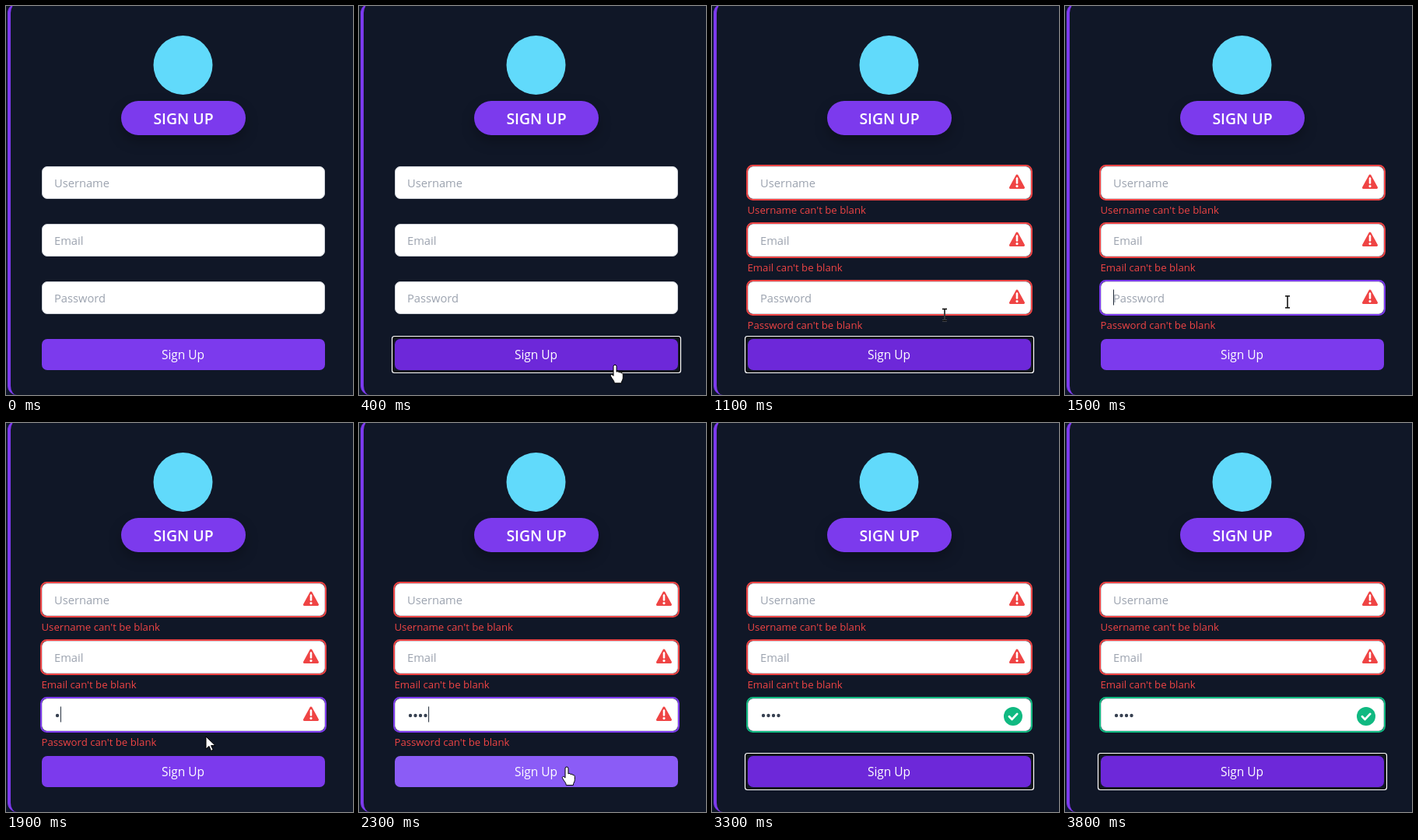
These frames come from a looping animation (446x500 px, 3.9 s). An HTML page:

```html
<!DOCTYPE html>
<html lang="en">
<head>
<meta charset="utf-8">
<title>Sign up form</title>
<style>
  html, body { margin: 0; width: 100%; height: 100%; overflow: hidden; background: #0f172a; }
  svg { display: block; width: 446px; height: 500px; font-family: "Open Sans", "Noto Sans", sans-serif; }
  .pill { fill: #7c3aed; filter: drop-shadow(0 8px 8px rgba(0, 0, 0, .25)); }
  .title { font-size: 19.4px; font-weight: 600; fill: #fff; text-anchor: middle; }
  .label { font-size: 15.5px; fill: #fff; text-anchor: middle; }
  .box { fill: #fff; stroke: #d1d5db; }
  .hint { font-size: 14.7px; fill: #9ca3af; }
  .error { font-size: 13.2px; fill: #ef4444; }
</style>
</head>
<body>
<svg viewBox="0 0 446 500">
  <defs>
    <g id="alert">
      <path d="M392 218 400.5 233.5H383.5Z" fill="#ef4444" stroke="#ef4444" stroke-width="3" stroke-linejoin="round"/>
      <path d="M392 221.5v6" stroke="#fff" stroke-width="2.6" stroke-linecap="round"/>
      <circle cx="392" cy="231.6" r="1.6" fill="#fff"/>
    </g>
  </defs>

  <rect x="2" y="-3" width="500" height="503" rx="12" fill="#7c3aed"/>
  <rect x="6" y="-3" width="496" height="503" rx="8" ry="12" fill="#101727"/>

  <circle cx="227.5" cy="76" r="38" fill="#61dafb"/>
  <rect class="pill" x="148" y="122" width="160" height="44" rx="22"/>
  <text class="title" x="228" y="152">SIGN UP</text>

  <g id="fields"></g>

  <g id="typed" fill="#374151"></g>
  <path id="caret" stroke="#1f2937"/>
  <g id="check">
    <circle cx="387" cy="377" r="12" fill="#10b981"/>
    <path d="M382 377.3l3.6 3.6 6.6-7" fill="none" stroke="#fff" stroke-width="2.8" stroke-linecap="round" stroke-linejoin="round"/>
  </g>

  <g id="focus" fill="none">
    <rect x="44" y="426" width="368" height="44" rx="3" stroke="#101010" stroke-width="2"/>
    <rect x="42.5" y="424.5" width="371" height="47" rx="3" stroke="#fff" stroke-width="1.2"/>
  </g>
  <rect id="button" x="46" y="428" width="364" height="40" rx="7"/>
  <text class="label" x="227.5" y="454">Sign Up</text>

  <g id="pointer" stroke-linejoin="round">
    <path id="arrow" d="M0 0v16l4-3.6 2.6 6 2.6-1.2-2.6-5.6h5.4z" fill="#fff" stroke="#000"/>
    <path id="hand" d="M-2 2a2 2 0 0 1 4 0v7c1-1 3-.6 3.2.8 1-1 2.7-.5 2.8 1 1-.8 2.3 0 2.3 1.8v4c0 3-2 4-2 7h-9c0-3-2.6-5-4.8-9-.8-1.8 1.2-3 2.6-1.4l.9.9z" fill="#fff" stroke="#000"/>
    <g id="beam" fill="none">
      <path d="M-3-7.5h6M0-7.5v15M-3 7.5h6" stroke="#777" stroke-width="1.8"/>
      <path d="M-3-7.5h6M0-7.5v15M-3 7.5h6" stroke="#000"/>
    </g>
  </g>
</svg>
<script>
  const LOOP = 3900, STEP = 100;
  const RED = [239, 68, 68], VIOLET = [124, 58, 237], GREEN = [16, 185, 129], WHITE = [255, 255, 255];
  const $ = id => document.getElementById(id);
  const show = (el, on) => { el.style.display = on ? "" : "none"; };
  const within = (t, a, b) => t >= a && t < b;

  const fields = ["Username", "Email", "Password"].map((name, i) => {
    const g = document.createElementNS("http://www.w3.org/2000/svg", "g");
    g.setAttribute("transform", `translate(0 ${74 * i})`);
    g.innerHTML = `
      <rect class="box" x="46.5" y="206.5" width="363" height="41" rx="6.5"/>
      <rect class="ring" x="45" y="205" width="366" height="44" rx="7.5" fill="none" stroke-width="2"/>
      <text class="hint" x="62" y="233">${name}</text>
      <g class="bad"><use href="#alert"/><text class="error" x="45.5" y="267">${name} can't be blank</text></g>`;
    $("fields").append(g);
    const pick = c => g.querySelector(c);
    return { ring: pick(".ring"), hint: pick(".hint"), bad: pick(".bad") };
  });

  $("typed").innerHTML = [0, 1, 2, 3].map(i => `<circle cx="${66 + 6.5 * i}" cy="376" r="2.2"/>`).join("");
  const dots = [...$("typed").children];

  // time, x, y of the pointer tip
  const path = [
    [0, 345, 530], [100, 342, 492], [300, 329, 461], [700, 329, 462], [1100, 299, 397],
    [1300, 290, 379], [1600, 284, 381], [1900, 257, 403], [2300, 267, 442], [2500, 267, 445],
    [2850, 267, 445], [3000, 267, 463], [3100, 267, 478], [3200, 268, 530], [LOOP, 268, 530]
  ];

  function pointerAt(t) {
    const i = path.findIndex(p => p[0] > t);
    const [a, b] = [path[i - 1], path[i]];
    const k = (t - a[0]) / (b[0] - a[0]);
    return [a[1] + (b[1] - a[1]) * k, a[2] + (b[2] - a[2]) * k];
  }

  function fade(from, to, k) {
    k = Math.max(0, Math.min(1, k));
    return `rgb(${from.map((v, i) => Math.round(v + (to[i] - v) * k))})`;
  }

  function passwordRing(t) {
    if (t < 1400) return fade(WHITE, RED, (t - 600) / 200);
    if (t < 2600) return fade(RED, VIOLET, (t - 1300) / 200);
    if (t <= 2800) return fade(VIOLET, RED, (t - 2500) / 350);
    return fade(RED, GREEN, (t - 2800) / 200);
  }

  function draw(t) {
    const failed = t >= 700, valid = t >= 2700;
    fields.forEach((f, i) => {
      show(f.ring, failed);
      show(f.bad, failed && !(i === 2 && valid));
      f.ring.setAttribute("stroke", i === 2 ? passwordRing(t) : fade(WHITE, RED, (t - 600) / 200));
    });

    const count = Math.max(0, Math.min(4, Math.floor((t - 1800) / 100)));
    show(fields[2].hint, !count);
    dots.forEach((d, i) => show(d, i < count));
    show($("caret"), within(t, 1400, 2600));
    $("caret").setAttribute("d", `M${count ? 64 + 6.4 * count : 62.5} 364.5v20`);
    show($("check"), valid);

    const [x, y] = pointerAt(t);
    const overButton = y >= 428 && y < 468;
    const overField = [206, 280, 354].some(top => y >= top && y < top + 44);
    const focused = within(t, 400, 1400) || t >= 2600;
    show($("focus"), focused);
    $("button").setAttribute("fill", focused ? "#6d28d9" : overButton ? "#8b5cf6" : "#7c3aed");

    $("pointer").setAttribute("transform", `translate(${x} ${y})`);
    show($("hand"), overButton);
    show($("beam"), overField);
    show($("arrow"), !overButton && !overField);
  }

  const start = performance.now();
  function tick() {
    const t = (performance.now() - start) % LOOP;
    draw(Math.floor(t / STEP) * STEP);
    requestAnimationFrame(tick);
  }
  tick();
</script>
</body>
</html>
```
